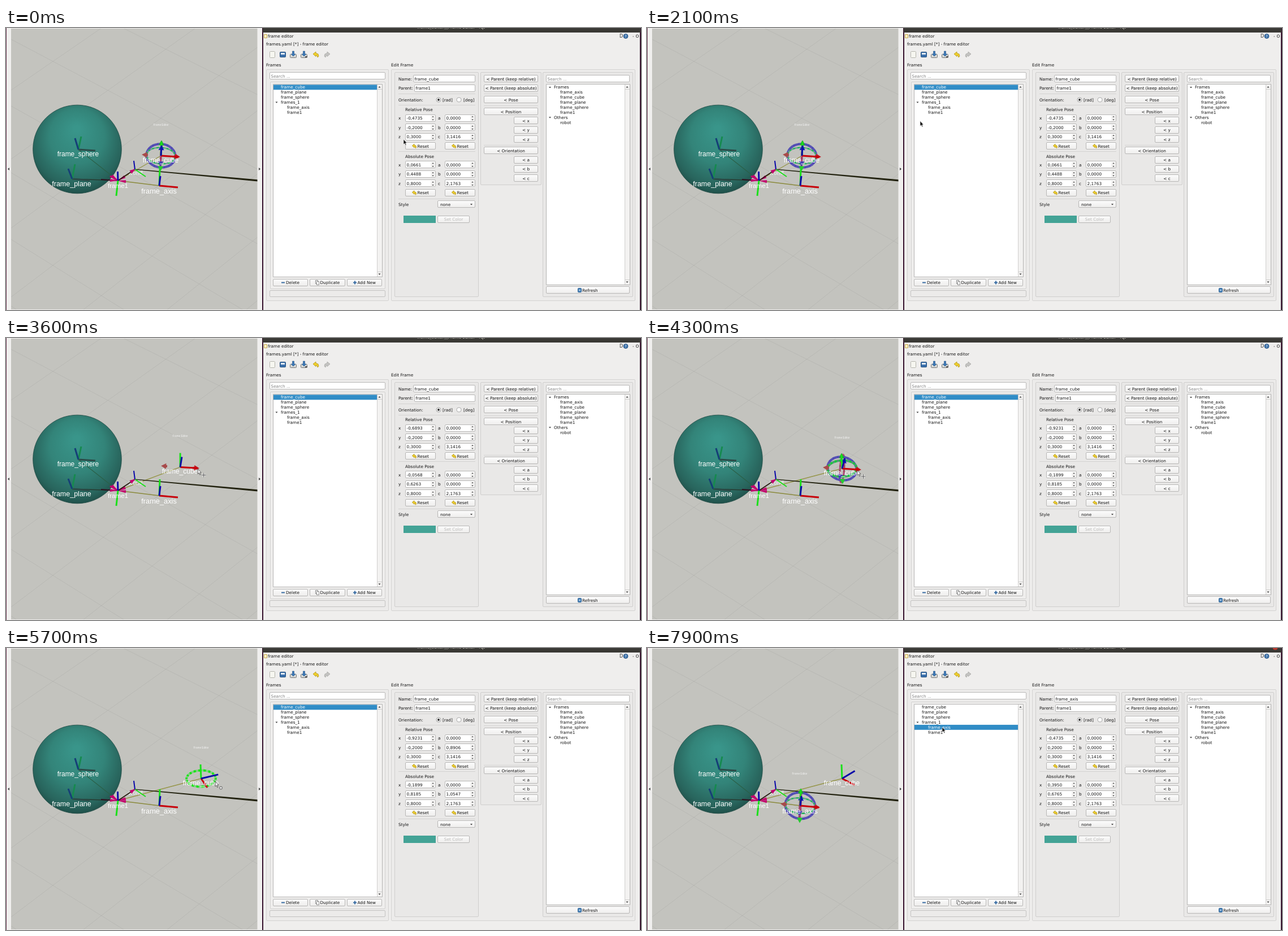
Write an HTML page with a canvas that moves like this. It is 1123 px wide and 499 px high and loops after 8 s.

```html
<!DOCTYPE html>
<html lang="en">
<head>
<meta charset="utf-8">
<style>
html, body { margin: 0; width: 100%; height: 100%; overflow: hidden; background: #efeeed; }
canvas { display: block; }
</style>
</head>
<body>
<canvas id="stage" width="1123" height="499"></canvas>
<script>
const g = document.getElementById('stage').getContext('2d');
const UI = '"DejaVu Sans", sans-serif';
const LABEL = '"Liberation Sans", Arial, sans-serif';
const RED = '#c8000a', GREEN = '#1be01b', BLUE = '#0a0aa8', PINK = '#c4006e';

// ---- motion: [time, values...] ----
const cursorPath = [
  [900, 703, 197], [1400, 574, 205], [1600, 490, 200], [1800, 445, 181], [2000, 511, 157],
  [2200, 455, 172], [2500, 350, 212], [2700, 312, 228], [2800, 309, 229], [3100, 309, 229],
  [3400, 331, 231], [3500, 331, 231], [4000, 372, 234], [4300, 372, 234], [4500, 361, 209],
  [4600, 361, 209], [4700, 361, 220], [4800, 361, 220], [4900, 361, 222], [5000, 361, 222],
  [5500, 371, 243], [5700, 370, 236], [5900, 367, 229], [6200, 367, 229], [6500, 452, 200],
  [6800, 512, 156], [7100, 513, 149], [7500, 513, 149], [7700, 522, 140]
];
const dragPath = [[3100, 0], [3400, .35], [3500, .35], [4000, 1]];
const pitchPath = [[5000, 0], [5300, .65], [5500, 1.0547], [5600, 1.0547], [5700, .8906], [5800, .6172]];

function at(path, t) {
  const i = path.findIndex(k => k[0] >= t);
  if (i === 0) return path[0].slice(1);
  if (i < 0) return path[path.length - 1].slice(1);
  const a = path[i - 1], b = path[i], p = (t - a[0]) / (b[0] - a[0]);
  return a.slice(1).map((v, j) => v + (b[j + 1] - v) * p);
}
const mix = (a, b, p) => a + (b - a) * p;
const num = v => v.toFixed(4).replace('.', ',');

// ---- drawing helpers ----
function text(s, x, y, align = 'left', color = '#151515', size = 7.3, family = UI) {
  g.font = `${size}px ${family}`;
  g.textAlign = align;
  g.fillStyle = color;
  g.fillText(s, x, y + size * .36);
}
function rect(x, y, w, h, color) { g.fillStyle = color; g.fillRect(x, y, w, h); }
function box(x0, y0, x1, y1, fill, border = '#b8b7b6', r = 1.5) {
  g.beginPath();
  g.roundRect(x0 + .5, y0 + .5, x1 - x0 - 1, y1 - y0 - 1, r);
  g.fillStyle = fill; g.fill();
  g.lineWidth = 1; g.strokeStyle = border; g.stroke();
}
function line(x0, y0, x1, y1, color, width = 1) {
  g.beginPath(); g.moveTo(x0, y0); g.lineTo(x1, y1);
  g.lineWidth = width; g.strokeStyle = color; g.stroke();
}
function poly(points, fill, border, width = .8) {
  g.beginPath();
  points.forEach(p => g.lineTo(p[0], p[1]));
  g.closePath();
  g.fillStyle = fill; g.fill();
  if (border) { g.lineWidth = width; g.strokeStyle = border; g.stroke(); }
}
function disc(x, y, r, fill, border) {
  g.beginPath(); g.arc(x, y, r, 0, 7);
  g.fillStyle = fill; g.fill();
  if (border) { g.lineWidth = .8; g.strokeStyle = border; g.stroke(); }
}
// small triangle, dir 1 = down, -1 = up
function tri(x, y, dir = 1, r = 2, color = '#444') {
  poly([[x - r, y - dir * r * .5], [x + r, y - dir * r * .5], [x, y + dir * r * .7]], color);
}
function button(s, x0, x1, y, textX, color) {
  const grad = g.createLinearGradient(0, y - 6, 0, y + 6);
  grad.addColorStop(0, '#fbfbfb'); grad.addColorStop(1, '#eeedec');
  box(x0, y - 6.5 | 0, x1, (y - 6.5 | 0) + 13, grad);
  if (textX) text(s, textX, y, 'left', color);
  else text(s, (x0 + x1) / 2, y, 'center', color);
}
function field(s, x0, x1, y, color, textX = x0 + 2.5) {
  const top = y - 6.5 | 0;
  box(x0, top, x1, top + 13, '#fff');
  text(s, textX, y, 'left', color);
}
function spin(s, x0, y) {
  field(s, x0, x0 + 54, y);
  rect(x0 + 45, y - 5, 8, 10, '#f3f2f1');
  tri(x0 + 49, y - 2.5, -1, 1.7); tri(x0 + 49, y + 2.8, 1, 1.7);
}
function backArrow(x, y, s, fill, edge) {
  poly([[-5, -1], [0, -5], [0, -2.5], [4, -1], [5, 3], [3, 5], [2, 2], [0, 1.5], [0, 3.5]]
    .map(p => [x + p[0] * s, y + p[1] * Math.abs(s)]), fill, edge, .7);
}
function reset(x, y) {
  button('Reset', x, x + 54, y, x + 21.5);
  backArrow(x + 16, y, .75, '#f0d02c', '#a88a10');
}
function scrollbar(x, y0, y1) {
  rect(x, y0, 9, y1 - y0, '#f3f2f1');
  line(x + .5, y0, x + .5, y1, '#cfcecd');
  line(x, y0 + 8.5, x + 9, y0 + 8.5, '#cfcecd');
  line(x, y1 - 8.5, x + 9, y1 - 8.5, '#cfcecd');
  tri(x + 4.5, y0 + 4.5, -1); tri(x + 4.5, y1 - 4.5);
}
function treeRow(s, x, i, selected) {
  const y = 104.8 + i * 8.87;
  if (selected) rect(473, y - 4.4, 183, 8.9, '#308cc6');
  text(s, x, y, 'left', selected ? '#fff' : '#151515');
}

// ---- 3D view ----
const parent = [198, 270], root = [228, 250], axisPos = [271, 279];
const add = (a, v, s = 1) => [a[0] + v[0] * s, a[1] + v[1] * s];

function head(tip, from, len, half, color) {
  const dx = tip[0] - from[0], dy = tip[1] - from[1], d = Math.hypot(dx, dy) || 1;
  const u = [dx / d, dy / d], b = add(tip, u, -len);
  poly([tip, [b[0] - u[1] * half, b[1] + u[0] * half], [b[0] + u[1] * half, b[1] - u[0] * half]], color);
}
function link(from, to, color, width = 1.4) {
  line(...from, ...to, color, width);
  head(to, from, 14, 2.6, PINK);
}
function axes(c, r, gr, b, colors = [RED, GREEN, BLUE], w = 3) {
  [r, gr, b].forEach((v, i) => line(...c, ...add(c, v), colors[i], w));
}
function ring(c, u, v, colors, width) {
  const steps = 36, k = .8;
  const p = i => {
    const a = i / steps * 2 * Math.PI;
    return add(add(c, u, k * Math.cos(a)), v, k * Math.sin(a));
  };
  for (let i = 0; i < steps; i++) line(...p(i), ...p(i + 1.05), colors[i % 2], width);
}
function arrows(c, v, front, back) {
  for (const [s, color] of [[-1, back], [1, front]]) {
    line(...add(c, v, .72 * s), ...add(c, v, .88 * s), color, 4);
    head(add(c, v, 1.06 * s), c, 9, 5, color);
  }
}
function gizmo(c, r, gr, b, mode, bright) {
  if (mode === 'turn') return ring(c, r, b, ['#17e317', '#7fd07f'], 4);
  if (mode !== 'move') {
    ring(c, gr, b, ['#b04a7c', '#a03c62'], 3);
    ring(c, r, gr, ['#4f49b4', '#5650b4'], 4.2);
    ring(c, r, b, bright ? ['#18c83c', '#4f9a72'] : ['#22b858', '#6f9a98'], bright ? 4 : 2.6);
    arrows(c, b, '#1414c0', '#4a46b4');
    arrows(c, gr, '#18b428', '#25cc30');
  }
  arrows(c, r, '#c01822', '#a84a4a');
}
function scene(t, drag, pitch, picked) {
  g.save();
  g.beginPath(); g.rect(9, 1, 435.5, 497); g.clip();
  rect(9, 1, 436, 498, '#c3c3be');
  for (let i = -4; i < 7; i++) {
    line(9, 20 + i * 118, 445, 250 + i * 132, 'rgba(90,90,90,.1)');
    line(9, 110 + i * 122, 445, -190 + i * 112, 'rgba(90,90,90,.1)');
  }

  const shade = g.createRadialGradient(125, 178, 5, 126, 205, 92);
  shade.addColorStop(0, '#39958a'); shade.addColorStop(.5, '#338479');
  shade.addColorStop(.85, '#28645c'); shade.addColorStop(1, '#1d4b45');
  disc(126, 214.5, 78.3, shade, '#1d4741');

  // frames inside the sphere look dimmed
  const dim = ['#2b4b48', '#168a50', '#153f77'];
  const ball = [128, 215], plane = [117, 267];
  line(...ball, ...parent, '#2a6048', 1.2);
  line(...plane, ...parent, '#263a30', 1.3);
  axes(ball, [30, 2], [5, -23], [-6, -20], dim);
  axes(plane, [31, 3], [5, -26], [-7, -18], dim);
  line(168, 268, 187, 269.5, '#301020', 2);

  const cube = [mix(274, 345, drag), mix(226, 231, drag)];
  const r0 = [32, 2], b0 = [mix(1, 5, drag), -18], green = [mix(1, -1, drag), -26];
  const cos = Math.cos(pitch), sin = Math.sin(pitch);
  const r = [cos * r0[0] - sin * b0[0], cos * r0[1] - sin * b0[1]];
  const b = [cos * b0[0] + sin * r0[0], cos * b0[1] + sin * r0[1]];

  link(cube, parent, '#96964a');
  link(axisPos, parent, '#8a8a3c');
  head(parent, ball, 14, 2.6, PINK);
  head(parent, plane, 14, 2.6, PINK);
  text('world', 229, 256, 'center', '#eee', 10.5, LABEL);
  poly([[228, 249.5], [445, 268.3], [445, 271.5], [228, 250.8]], '#22220f');
  line(...parent, ...root, '#24180c', 1.6);
  head(root, parent, 9, 3.5, PINK);
  axes(root, [-8, 4], [19, 13], [-2, -15], [PINK, GREEN, BLUE], 2);
  axes(parent, [-14, -8], [-3, 27], [-.5, -16], [PINK, GREEN, BLUE]);

  const axisR = [33, 3], axisG = [1, -29], axisB = [2, -17];
  const tag = c => text('Frame Editor', c[0], c[1], 'center', '#f4f4f4', 4.7, LABEL);
  if (picked) {
    gizmo(axisPos, axisR, axisG, axisB);
    tag([270, 222]);
  } else {
    const mode = t >= 3200 && t < 4300 ? 'move' : t >= 5100 && t < 5900 ? 'turn' : '';
    gizmo(cube, r, green, b, mode, t >= 4300 && t < 5100);
    tag([cube[0], cube[1] - 55]);
  }
  axes(axisPos, axisR, axisG, axisB);
  axes(cube, r.map(v => v * .96), green.map(v => v * .96), b);

  const label = (s, x, y, size) => text(s, x, y, 'center', '#fff', size, LABEL);
  label('frame_sphere', 127.5, 222.5, 11.9);
  label('frame_plane', 116, 275.5, 12.5);
  label('frame1', 198, 278.5, 11.6);
  label('frame_axis', 270.5, 288, 12.8);
  label('frame_cube', cube[0] - .5, cube[1] + 7.5, 12);
  g.restore();
}

// ---- editor window ----
function toolbar() {
  const y = 47;
  box(466, y - 6, 476, y + 6, '#f6f6f0', '#b5b5ae', 1);
  box(484, y - 5, 495, y + 5, '#3a70ac', '#24507e', 1);
  rect(486, y - 3, 7, 3, '#dfe8f0');
  for (const x of [508, 527]) {
    box(x - 6, y - 1, x + 6, y + 6, '#d4d6d4', '#777', 1);
    poly([[x - 1.5, y - 6], [x + 1.5, y - 6], [x + 1.5, y - 1], [x + 4, y - 1], [x, y + 3], [x - 4, y - 1], [x - 1.5, y - 1]], '#3a78b8', '#24507e', .6);
  }
  rect(529, y + 3, 4, 2, '#555');
  backArrow(548, y, 1, '#f0d02c', '#a88a10');
  backArrow(568, y, -1, '#c4c4c2', '#a2a2a0');
}
function listPanel(picked) {
  box(460, 73, 677, 483, '#ecebea', '#d3d2d1');
  field('Search ...', 466, 671, 85, '#858585');
  box(467, 95, 671, 462, '#efeeed', '#d3d2d1');
  box(472, 99, 666, 441, '#fff', '#b5b4b3', 0);
  scrollbar(656, 100, 440);
  ['frame_cube', 'frame_plane', 'frame_sphere', 'frames_1', 'frame_axis', 'frame1'].forEach((s, i) =>
    treeRow(s, i < 4 ? 486 : 497, i, i === (picked ? 4 : 0)));
  tri(478.5, 131.5);
  button('Delete', 472, 534, 450.5, 495);
  line(487, 450.5, 493, 450.5, '#3a6ea5', 2);
  button('Duplicate', 537, 600, 450.5, 555.5);
  box(547, 446, 552, 453, '#fff', '#888', 0); box(549, 448, 554, 455, '#fff', '#888', 0);
  button('Add New', 603, 665, 450.5, 621.5);
  line(614, 450.5, 620, 450.5, '#3a6ea5', 2); line(617, 447.5, 617, 453.5, '#3a6ea5', 2);
  box(466, 464, 671, 476, '#ecebea', '#c2c1c0');
}
function pose(title, y, v) {
  text(title, 706, y);
  [0, 1, 2].forEach(i => {
    const row = y + 14.7 + i * 16.6;
    text('xyz'[i], 694, row);
    spin(v[i], 706, row);
    text('abc'[i], 764, row);
    spin(v[i + 3], 776, row);
  });
  reset(706, y + 64.3); reset(776, y + 64.3);
}
function editPanel(name, rel, abs) {
  box(681, 73, 1113, 483, '#ecebea', '#d3d2d1');
  box(687, 78, 836, 476, '#e9e8e7', '#cfcecd');
  box(839, 78, 947, 278, '#e9e8e7', '#cfcecd');
  box(949, 78, 1109, 476, '#e9e8e7', '#cfcecd');
  text('Name:', 694, 90); field(name, 720, 830, 90);
  text('Parent:', 694, 106.5); field('frame1', 722, 830, 106.5);
  for (const y of [116.5, 136.5, 218.5, 302.5]) line(694, y, 830, y, '#d4d3d2');
  text('Orientation:', 694, 127);
  disc(765, 127, 4, '#fff', '#888'); disc(765, 127, 2, '#333');
  text('[rad]', 772, 127);
  disc(801, 127, 4, '#fff', '#999');
  text('[deg]', 809, 127);
  pose('Relative Pose', 144.8, rel);
  pose('Absolute Pose', 227.3, abs);
  text('Style', 694, 312);
  button('none', 763, 830, 312, 768);
  tri(823, 312);
  rect(703, 332, 57, 13, '#43a396');
  button('Set Color', 763, 820, 338.5, 0, '#bcbbba');

  button('< Parent (keep relative)', 845, 941, 90);
  button('< Parent (keep absolute)', 845, 941, 106.5);
  line(845, 116.5, 941, 116.5, '#d4d3d2');
  button('< Pose', 845, 941, 127);
  line(845, 137.5, 941, 137.5, '#d4d3d2');
  button('< Position', 845, 941, 148);
  button('< Orientation', 845, 941, 217.3);
  [...'xyz'].forEach((s, i) => button('< ' + s, 898, 941, 164.3 + i * 16.3));
  [...'abc'].forEach((s, i) => button('< ' + s, 898, 941, 233.5 + i * 16.3));
  line(845, 207.5, 941, 207.5, '#d4d3d2');

  field('Search ...', 955, 1103, 90, '#858585');
  box(955, 99, 1104, 455, '#fff', '#b5b4b3', 0);
  scrollbar(1094, 100, 454);
  ['Frames', 'frame_axis', 'frame_cube', 'frame_plane', 'frame_sphere', 'frame1', 'Others', 'robot']
    .forEach((s, i) => treeRow(s, i % 6 ? 980 : 969, i));
  tri(962, 105); tri(962, 158.3);
  button('Refresh', 955, 1103, 464, 1019);
  box(1011, 460, 1018, 468, '#4b86bd', '#2c5f90', 1);
  line(1013, 464, 1016, 464, '#fff');
}
function windowFrame(focused) {
  rect(0, 0, 1123, 499, '#f0efee');
  rect(0, 0, 1, 499, '#6b3550');
  rect(453, 0, 670, 499, '#35112c');
  rect(455, 0, 666, 499, '#efeeed');
  rect(454, 0, 668, 8, '#3a3935');
  text('frame_editor__Frame Editor - rqt', 787, -2.2, 'center', '#dddad2', 7.9, '"Noto Sans", sans-serif');
  if (focused) disc(1111, -1, 4.5, '#b8392e');
  box(456, 11, 462, 18, '#f7efc4', '#c8a850', 0);
  text('frame editor', 463, 14.5);
  text('D', 1085, 14.5, 'left', '#333', 8);
  disc(1096, 14.5, 4, '#3f74ad', '#254e7c');
  text('?', 1096, 14.5, 'center', '#fff', 6.5);
  text('-', 1108, 14.5); text('O', 1113.5, 14.5);
  text('frames.yaml [*] - frame editor', 460, 28);
  text('Frames', 460, 65.5);
  text('Edit Frame', 681, 65.5);
  // splitter handles
  poly([[6, 247], [6, 252], [3, 249.5]], '#444');
  poly([[447, 247], [447, 252], [450, 249.5]], '#444');
}
function pointer(x, y, t) {
  const inView = x < 440;
  poly([[0, 0], [0, 9], [2, 7.2], [3.6, 10.6], [5, 10], [3.5, 6.7], [6, 6.5]].map(p => [x + p[0], y + p[1]]),
    inView ? '#f4f4f4' : '#111', inView ? '#333' : '#eee', .7);
  if (!inView) return;
  const cx = x + 10.5, cy = y + 11;
  if (t >= 5100 && t < 5900) return disc(cx - .5, cy + .5, 2.5, '#ddd', '#444');
  line(cx - 4, cy, cx + 4, cy, '#eee', 2.6); line(cx, cy - 4, cx, cy + 4, '#eee', 2.6);
  line(cx - 4, cy, cx + 4, cy, '#555'); line(cx, cy - 4, cx, cy + 4, '#555');
}

function draw(now) {
  const t = Math.floor(now % 8000 / 100) * 100;
  const picked = t >= 7800;
  const [drag] = at(dragPath, t);
  const [relPitch] = at(pitchPath, t), [absPitch] = at(pitchPath, t - 100);
  const rel = picked ? [-.4735, .2, .3, 0, 0, 3.1416]
    : [mix(-.4735, -.9231, drag), -.2, .3, 0, relPitch, 3.1416];
  const abs = picked ? [.395, .6765, .8, 0, 0, 2.1763]
    : [mix(.0661, -.1899, drag), mix(.4488, .8185, drag), .8, 0, absPitch, 2.1763];

  windowFrame(t >= 7600);
  toolbar();
  listPanel(picked);
  editPanel(picked ? 'frame_axis' : 'frame_cube', rel.map(num), abs.map(num));
  scene(t, drag, absPitch, picked);
  pointer(...at(cursorPath, t), t);
}

const start = performance.now();
function tick() {
  draw(performance.now() - start);
  requestAnimationFrame(tick);
}
tick();
</script>
</body>
</html>
```
